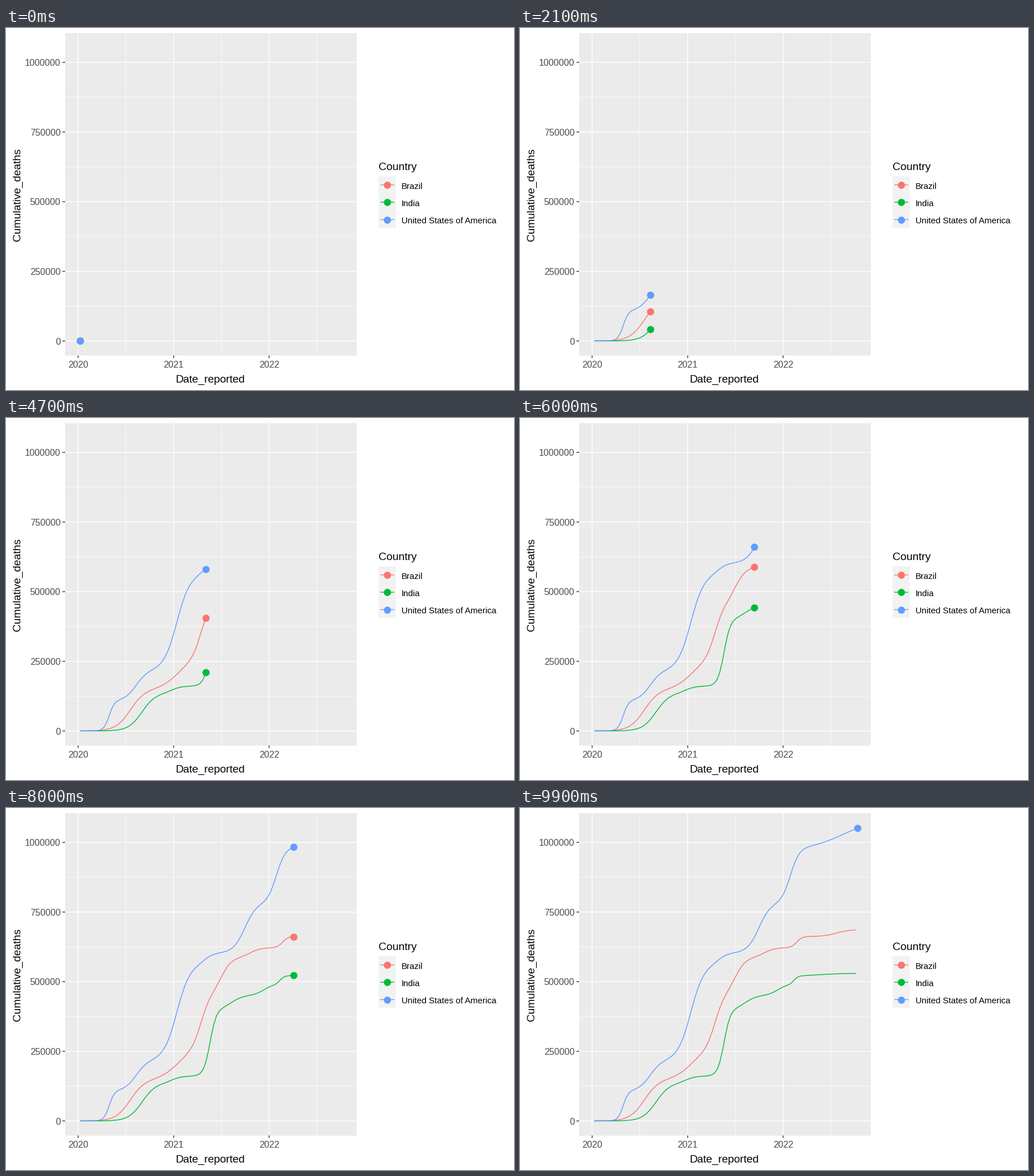
A matplotlib script that plays this animation: 885 by 632 pixels, repeating every 10000 ms.

```python
import numpy as np
import matplotlib.pyplot as plt
from matplotlib.animation import FuncAnimation
from matplotlib.patches import Rectangle

W, H, DPI = 885, 632, 72  # at 72 dpi one point is one pixel
FRAMES, INTERVAL = 100, 100
LEFT, RIGHT, TOP, BOTTOM = 103, 610.5, 9.4, 571.5
FIRST_DAY, DAYS_PER_FRAME, LAST_DAY = 8.35, 10.215, 1015
GRID, LINE, DOT = 1.4, 1.4, 12.5

plt.rcParams["font.family"] = "Liberation Sans"

# Each curve is a sum of epidemic waves: peak day, spread in days, thousands of deaths
SERIES = [
    ("Brazil", "#F8766D",
     [(200, 28, 150), (378, 32, 105), (470, 18, 200), (549, 20, 132),
      (660, 20, 35), (783, 10, 40), (935, 25, 25)]),
    ("India", "#00BA38",
     [(245, 26, 137), (360, 18, 24), (505, 12, 240), (588, 22, 50),
      (710, 18, 38), (772, 8, 30), (860, 50, 11)]),
    ("United States of America", "#619CFF",
     [(119, 10, 108), (222, 22, 110), (378, 25, 345), (484, 18, 40),
      (638, 22, 178), (759, 17, 196), (960, 60, 103)]),
]


def px(day):
    """Stage x of a day counted from 1 January 2020."""
    return 125.6 + 0.4552 * day


def py(thousands):
    return 546.4 - 0.4864 * thousands


def deaths(waves, day):
    return sum(size / (1 + np.exp((peak - day) / spread))
               for peak, spread, size in waves)


fig = plt.figure(figsize=(W / DPI, H / DPI), dpi=DPI, facecolor="white")
ax = fig.add_axes([0, 0, 1, 1])
ax.set_xlim(0, W)
ax.set_ylim(H, 0)
ax.axis("off")


def rect(x0, y0, x1, y1, color):
    ax.add_patch(Rectangle((x0, y0), x1 - x0, y1 - y0, fc=color, lw=0, zorder=0))


def stroke(xs, ys, color, width, z=1):
    return ax.plot(xs, ys, color=color, lw=width, zorder=z, snap=False,
                   solid_capstyle="butt", solid_joinstyle="round")[0]


def dot(x, y, color, z=5):
    return ax.plot([x], [y], "o", color=color, ms=DOT, mew=0, zorder=z, snap=False)[0]


def label(x, y, text, size, color="black", ha="left", **kw):
    ax.text(x, y, text, fontsize=size, color=color, ha=ha, va="baseline", **kw)


def grid_x(day, width, z):
    stroke([px(day)] * 2, [TOP, BOTTOM], "white", width, z)


def grid_y(thousands, width, z):
    stroke([LEFT, RIGHT], [py(thousands)] * 2, "white", width, z)


# Panel, grid and axis ticks
rect(LEFT, TOP, RIGHT, BOTTOM, "#EBEBEB")
for year, day in ((2020, 0), (2021, 366), (2022, 731)):
    x = px(day)
    grid_x(day, GRID, 2)
    grid_x(day + 182.5, GRID / 2, 1)
    stroke([x, x], [BOTTOM, BOTTOM + 4.6], "#333333", GRID)
    label(x, 593, str(year), 16, "#4D4D4D", "center")
for k in range(0, 1001, 250):
    y = py(k)
    grid_y(k, GRID, 2)
    if k < 1000:
        grid_y(k + 125, GRID / 2, 1)
    stroke([LEFT - 4.6, LEFT], [y, y], "#333333", GRID)
    label(95, y + 6.2, str(k * 1000), 16, "#4D4D4D", "right")

label(356.3, 619, "Date_reported", 19, ha="center")
label(25, 290.7, "Cumulative_deaths", 19, ha="center",
      rotation=90, rotation_mode="anchor")

# Legend
label(649, 248, "Country", 19)
rect(649, 258.8, 679.4, 349.4, "#F2F2F2")
for i, (name, color, _) in enumerate(SERIES):
    y = 273.9 + 30.3 * i
    stroke([652.2, 676.4], [y, y], color, LINE)
    dot(664.3, y, color)
    label(689, y + 6.8, name, 15)

# Curves
days = np.minimum(FIRST_DAY + DAYS_PER_FRAME * np.arange(FRAMES), LAST_DAY)
xs = px(days)
curves = []
for i, (_, color, waves) in enumerate(SERIES):
    line = stroke([], [], color, LINE, 3 + 0.1 * i)
    curves.append((py(deaths(waves, days)), line, dot(0, 0, color, 5 + 0.1 * i)))


def update(k):
    for i, (ys, line, head) in enumerate(curves):
        # Only the last country reports on the final day
        ended = k == FRAMES - 1 and i < len(curves) - 1
        n = k if ended else k + 1
        line.set_data(xs[:n], ys[:n])
        head.set_data([xs[k]], [ys[k]])
        head.set_visible(not ended)
    return [artist for c in curves for artist in c[1:]]


anim = FuncAnimation(fig, update, frames=FRAMES, interval=INTERVAL,
                     repeat=True, repeat_delay=0)
plt.show()
```
